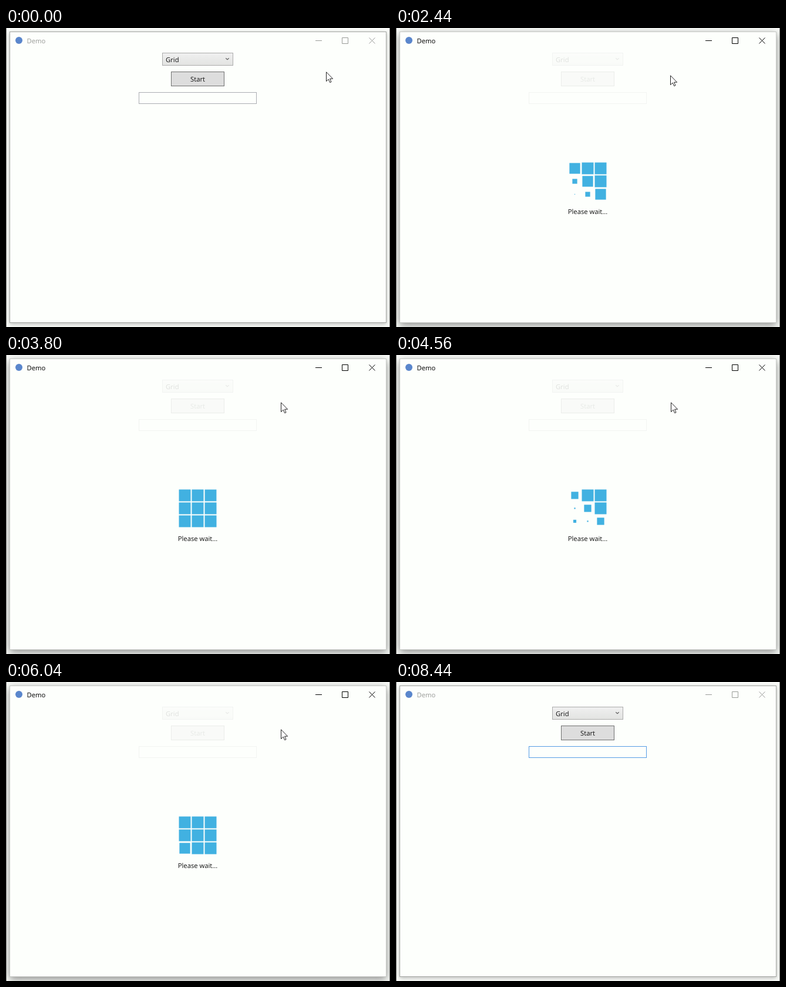
Recreate the animation shown at these times as an HTML page. Size 654 by 508 pixels, loop 8.48 s.

```html
<!DOCTYPE html>
<html lang="en">
<head>
<meta charset="utf-8">
<title>Demo</title>
<style>
  html, body { margin: 0; width: 100%; height: 100%; overflow: hidden; background: #fdfffc; }
  #stage { position: relative; width: 654px; height: 508px; overflow: hidden; background: #fbfdfa; }
  #window {
    position: absolute; left: 6px; top: 6px; width: 640px; height: 493px;
    background: #fdfffc; border: 1px solid #a3a5a2;
    box-shadow: 0 2px 7px rgba(0, 0, 0, .28);
  }
  .active #window { border-color: #c6c8c5; box-shadow: 0 4px 13px rgba(0, 0, 0, .45); }
  svg { position: absolute; left: 0; top: 0; }
  text { font: 11.25px "Open Sans", "Noto Sans", sans-serif; fill: #111; text-rendering: geometricPrecision; }

  #title { fill: #999b98; }
  #caption { fill: none; stroke: #999b98; }
  .active #title { fill: #000; }
  .active #caption { stroke: #000; }

  #button { fill: #dddddd; stroke: #707070; }
  .hover #button { fill: #bee6fd; stroke: #3c7fb1; }
  #textbox { fill: #fdfffc; stroke: #abadb3; }
  .focus #textbox { stroke: #569de5; }
  .busy #form { opacity: .12; }
  .busy #buttonText { fill: #555; }

  #busy, #caret { visibility: hidden; }
  .busy #busy, .caret #caret { visibility: visible; }
  #cells { fill: #41b1e1; }
</style>
</head>
<body>
<div id="stage">
  <div id="window"></div>
  <svg width="654" height="508" viewBox="0 0 654 508">
    <defs>
      <linearGradient id="comboFill" x2="0" y2="1">
        <stop offset="0" stop-color="#f0f0f0"/>
        <stop offset="1" stop-color="#e2e3e1"/>
      </linearGradient>
    </defs>
    <path d="M.5 0V508M653.5 0V508" stroke="#7b7d7a"/>

    <circle cx="22" cy="21" r="6" fill="#5a86cc"/>
    <text id="title" x="35.5" y="26">Demo</text>
    <g id="caption">
      <path d="M527 21.5H538M572.5 16.5H582.5V26.5H572.5Z"/>
      <path d="M618.5 16.5L628.5 26.5M628.5 16.5L618.5 26.5"/>
    </g>

    <g id="form">
      <rect x="266.5" y="42.5" width="120" height="21" fill="url(#comboFill)" stroke="#acacac"/>
      <text x="272" y="58">Grid</text>
      <path d="M374.3 51.2L377 53.7L379.7 51.2" fill="none" stroke="#606060" stroke-width="1.2"/>
      <rect id="button" x="281.5" y="74.5" width="90" height="24"/>
      <text id="buttonText" x="326.5" y="91" text-anchor="middle">Start</text>
      <rect id="textbox" x="226.5" y="109.5" width="200" height="19"/>
      <path id="caret" d="M230.5 111V126" stroke="#000"/>
    </g>

    <g id="busy">
      <g id="cells"></g>
      <text x="326.5" y="316" text-anchor="middle">Please wait...</text>
    </g>

    <path id="cursor" d="M.5 .8V16.6L4.2 13.1L6.7 18.6L9 17.6L6.6 12.2H11.6Z"
          fill="#fff" stroke="#222" stroke-linejoin="round"/>
  </svg>
</div>
<script>
  const LOOP = 8480, STEP = 40;
  const BUSY_START = 1800, BUSY_END = 6840, ACTIVE_START = 1640, ACTIVE_END = 8440;
  const CYCLE = 2000, FIRST_CYCLE = 2005, STAGGER = 200, SHRINK = 400, GROW = 600;
  const CELL = 20, PITCH = 22;

  const byId = id => document.getElementById(id);
  const stage = byId("stage"), cursor = byId("cursor");
  const between = (t, from, to) => t >= from && t < to;
  const progress = (t, from, to) => Math.min(1, Math.max(0, (t - from) / (to - from)));
  const smooth = p => p * p * (3 - 2 * p);
  const mix = (a, b, p) => a + (b - a) * p;

  // The wave runs from the bottom left cell to the top right one.
  const cells = Array.from({ length: 9 }, (_, i) => {
    const col = i % 3, row = Math.floor(i / 3);
    const node = document.createElementNS("http://www.w3.org/2000/svg", "rect");
    byId("cells").append(node);
    return { node, x: 304.5 + col * PITCH, y: 238.5 + row * PITCH, delay: (col + 2 - row) * STAGGER };
  });

  function cellScale(age) {
    if (age <= 0) return 1;
    return age < SHRINK ? 1 - age / SHRINK : Math.min(1, (age - SHRINK) / GROW);
  }

  function drawCells(t) {
    const phase = t < FIRST_CYCLE ? 0 : (t - FIRST_CYCLE) % CYCLE;
    for (const { node, x, y, delay } of cells) {
      const size = CELL * cellScale(phase - delay);
      node.setAttribute("x", x - size / 2);
      node.setAttribute("y", y - size / 2);
      node.setAttribute("width", size);
      node.setAttribute("height", size);
    }
  }

  function cursorAt(t) {
    if (t < 40) return [545, 74];
    if (t < 1720) {
      const p = smooth(progress(t, 440, 1200));
      return [mix(544, 346, p), mix(74, 78, p) + 3 * Math.sin(Math.PI * p)];
    }
    if (t < 7400) {
      const p = smooth(progress(t, 1760, 2480));
      return [mix(346, 468, p), mix(78, 80, p)];
    }
    const p = progress(t, 7360, 7520) ** 1.6;
    return [mix(468, 618, p), mix(80, 66, p)];
  }

  function draw(t) {
    const [x, y] = cursorAt(t);
    const states = {
      active: between(t, ACTIVE_START, ACTIVE_END),
      busy: between(t, BUSY_START, BUSY_END),
      hover: t < BUSY_START && x < 371,
      focus: t >= BUSY_END,
      caret: between(t, 6880, 7400) || between(t, 7960, ACTIVE_END)
    };
    for (const name in states) stage.classList.toggle(name, states[name]);
    cursor.setAttribute("transform", `translate(${Math.round(x)} ${Math.round(y)})`);
    cursor.style.visibility = t < 7560 ? "visible" : "hidden";
    drawCells(t);
  }

  const start = performance.now();
  function tick() {
    const t = (performance.now() - start) % LOOP;
    draw(Math.floor(t / STEP) * STEP);
    requestAnimationFrame(tick);
  }
  tick();
</script>
</body>
</html>
```
